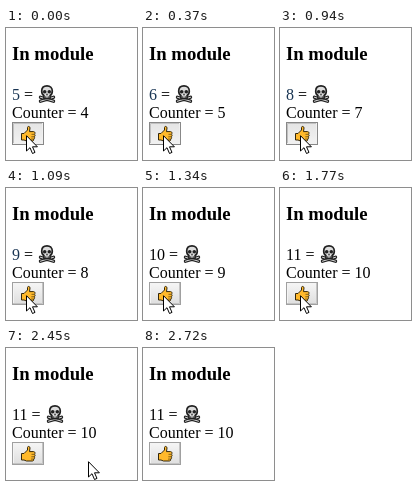
Animation, 131 px wide and 132 px high, one loop 2.87 s. Source, as an HTML page:

```html
<!DOCTYPE html>
<html lang="en">
<head>
<meta charset="utf-8">
<title>Counter</title>
<style>
  html, body { margin: 0; width: 100%; height: 100%; overflow: hidden; background: #fff; }
  svg { display: block; width: 131px; height: 132px; }
  text { font: 16px "Liberation Serif", "Times New Roman", serif; white-space: pre; }
  .title { font-size: 18.72px; font-weight: bold; }
</style>
</head>
<body>
<svg viewBox="0 0 131 132">
  <defs>
    <linearGradient id="raised" x2="0" y2="1">
      <stop stop-color="#f6f6f6"/><stop offset="1" stop-color="#dedede"/>
    </linearGradient>
    <linearGradient id="sunken" x2="0" y2="1">
      <stop stop-color="#e4e4e4"/><stop offset="1" stop-color="#f2f2f2"/>
    </linearGradient>
    <path id="bones" d="M2 12.3 L15 16.2 M15 12.3 L2 16.2" fill="none"/>
  </defs>

  <text class="title" x="6" y="32">In module</text>
  <text x="6" y="72"><tspan id="value"></tspan> =</text>
  <text id="counter" x="6" y="90"></text>

  <g id="skull" stroke-linecap="round" stroke-linejoin="round">
    <use href="#bones" stroke="#222" stroke-width="3.4"/>
    <use href="#bones" stroke="#ddd" stroke-width="1"/>
    <path d="M8.5 .8 C5.2 .8 3.2 2.9 3.2 6 C3.2 8.4 4 9.8 5.4 10.6 V13.6 H11.6 V10.6 C13 9.8 13.8 8.4 13.8 6 C13.8 2.9 11.8 .8 8.5 .8 Z"
          fill="#ddd" stroke="#222" stroke-width="1.7"/>
    <g fill="#222">
      <circle cx="6.2" cy="6.8" r="1.8"/><circle cx="10.8" cy="6.8" r="1.8"/>
      <path d="M8.5 8 L9.5 10.2 H7.5 Z"/>
    </g>
    <path d="M7.3 11.6 V13 M9.7 11.6 V13" stroke="#222" stroke-width=".9"/>
  </g>

  <rect id="face" x="6.5" y="94.5" width="31" height="22"/>
  <path id="edgeTop" d="M7.5 116 V95.5 H37" fill="none"/>
  <path id="edgeBottom" d="M7 115.5 H36.5 V95" fill="none"/>
  <g id="thumb" stroke="#33270c" stroke-linejoin="round">
    <path d="M15.5 105.5 H18 L21.5 102 V99.5 C21.5 98 24 98 24 100 L23.5 103.6 H27.5 C29.2 103.6 29.4 105.6 28.4 106.2 C29.5 107 29.2 108.4 28.2 108.7 C29 109.6 28.6 110.9 27.6 111.1 C28 112.3 27.3 113 26.3 113 H20.5 L18 112 H15.5 Z"
          fill="#ffb92b"/>
    <path d="M25.5 106.3 H28 M25.3 108.8 H28 M25 111.1 H27.5" stroke-width=".6"/>
  </g>

  <path id="cursor" d="M.5 .7 V16 L4 12.7 L6.5 18.5 L9 17.4 L6.5 11.8 H11.4 Z"
        fill="#fff" stroke="#000"/>
</svg>
<script>
  const LOOP = 2870;
  const clicks = [120, 520, 800, 1090, 1340, 1770];
  const presses = [[0, 120], [370, 520], [670, 800], [940, 1090], [1620, 1770]];
  const pointer = [
    [0, 20, 107], [2180, 41, 105], [2300, 57, 105],
    [2450, 82, 113], [2570, 110, 123], [2720, 140, 140]
  ];
  const el = id => document.getElementById(id);
  const set = (id, name, value) => el(id).setAttribute(name, value);

  function draw(t) {
    const count = clicks.filter(at => t >= at).length;
    const value = 5 + count;
    const wide = value > 9;
    const down = presses.some(([from, to]) => t >= from && t < to);
    const [, x, y] = pointer.filter(([at]) => t >= at).pop();

    el("value").textContent = value;
    set("value", "fill", wide ? "#000" : "#1a3654");
    el("counter").textContent = `Counter = ${4 + count}`;
    set("skull", "transform", `translate(${wide ? 40.5 : 32.5} 57)`);

    set("face", "fill", down ? "url(#sunken)" : "url(#raised)");
    set("face", "stroke", down ? "#888" : "#a0a0a0");
    set("edgeTop", "stroke", down ? "#c0c0c0" : "#f4f4f4");
    set("edgeBottom", "stroke", down ? "#f0f0f0" : "#c4c4c4");
    set("cursor", "transform", `translate(${x} ${y})`);
  }

  const start = performance.now();
  function tick() {
    draw((performance.now() - start) % LOOP);
    requestAnimationFrame(tick);
  }
  tick();
</script>
</body>
</html>
```
